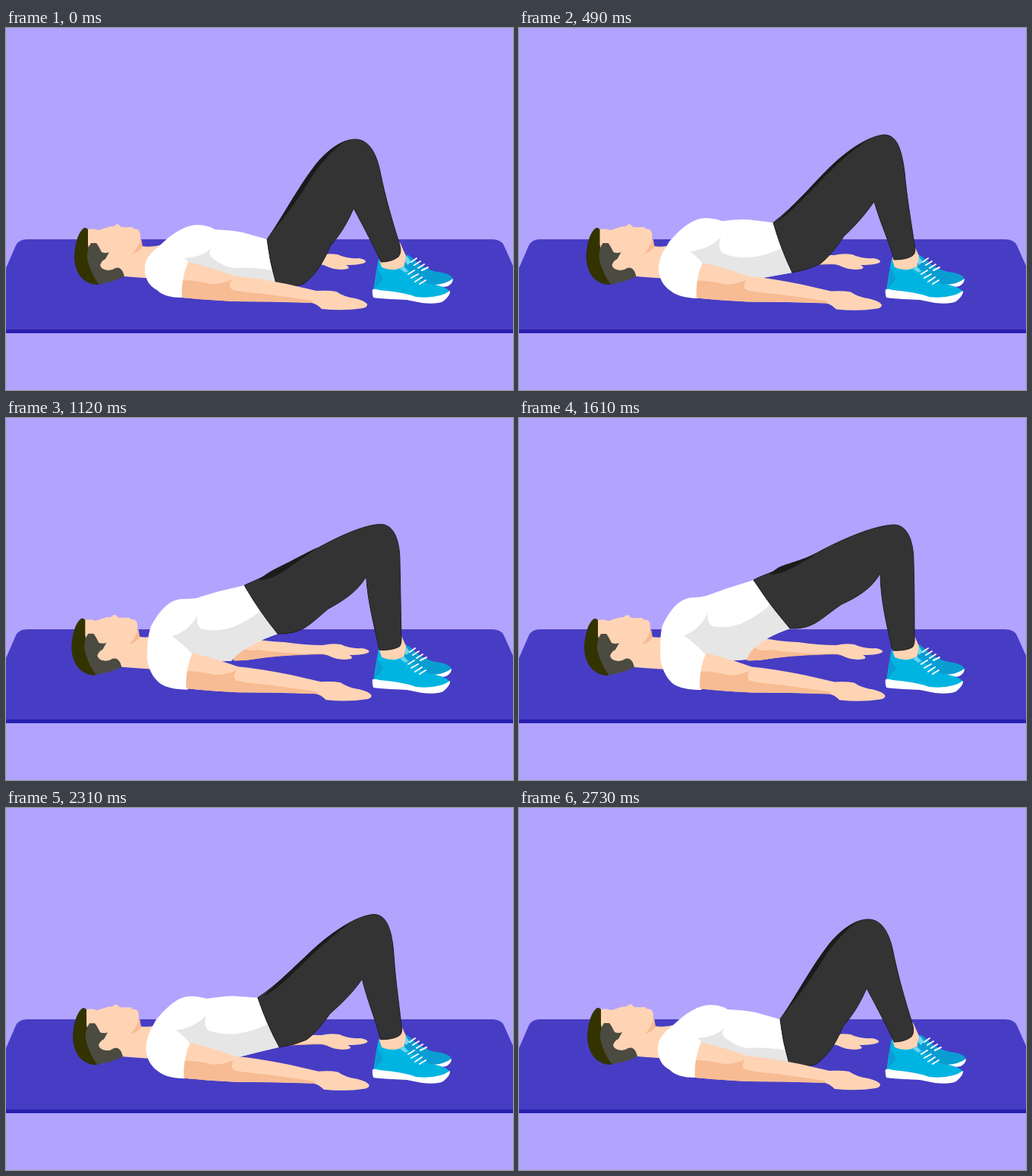
Write an HTML page that moves like this. It is 668x478 px and loops after 2.8 s.

```html
<!DOCTYPE html>
<html lang="en">
<head>
<meta charset="utf-8">
<title>Glute bridge</title>
<style>
  html, body { margin: 0; height: 100%; overflow: hidden; background: #b2a3ff; }
  svg { display: block; width: 100%; height: 100%; }
  .skin { fill: #ffd4b5; }
  .shade { fill: #f7bc93; }
  .blue { fill: #00b4e1; }
  .deep { fill: #0a9dd2; }
  .white { fill: #fff; }
  .lace { fill: none; stroke: #fff; stroke-width: 2; stroke-linecap: round; }
</style>
</head>
<body>
<svg viewBox="0 0 668 478">
  <path fill="#473dc4" d="M0 317L13 287Q17 279 28 279H640Q652 279 656 287L668 314V398H0Z"/>
  <path fill="#2a20b0" d="M0 398H668V403H0Z"/>

  <g id="farArm">
    <path class="skin" d="M300 320Q304 300 320 290Q340 295 368 296Q395 300 418 300Q430 297 442 299Q454 305 470 304Q480 306 479 309Q474 313 453 313Q459 316 455 318Q440 321 426 314Q420 311 400 312Q360 313 330 318Q312 321 300 320Z"/>
    <path class="shade" d="M300 320Q304 303 310 303Q322 309 331 306Q380 313 420 311L420 312Q365 313 330 318Q312 321 300 320Z"/>
  </g>

  <g id="farShoe">
    <path class="deep" d="M522 303Q527 297 532 301L545 312Q560 322 575 323Q588 326 589 332L580 340L560 340L526 320Z"/>
    <path class="white" d="M564 339Q580 338 589 331Q589 337 582 341Q574 343 564 341Z"/>
    <path fill="#6fd6f2" d="M523 304Q526 300 529 302L534 309L529 313Z"/>
    <path class="lace" d="M534 309L541 304M538 313L546 308M543 317L551 312M548 320L556 316"/>
  </g>

  <path class="skin" d="M492 303L519 283L527 301L524 318L508 322L492 318Z"/>

  <g id="head">
    <path class="skin" d="M108 266Q115 264 122 267Q130 264 138 262Q142 263 144 260L148 259L152 263L164 263Q167 262 168 265L174 266Q177 269 177 275Q176 281 179 288Q192 290 206 286L215 332Q180 330 156 328L124 332L106 300Z"/>
    <path class="shade" d="M178 277L180 289Q174 297 166 298Q174 290 178 277Z"/>
    <path fill="#333300" d="M103 264C95 269 90 287 90 304C91 323 101 338 120 339L127 337L113 310L108 286L108 266Q105 263 103 264Z"/>
    <path fill="#4b4b41" d="M112 284Q106 292 107 305Q112 325 122 338Q141 336 156 328L154 322Q150 315 144 317Q140 320 135 320Q125 319 124 313Q126 307 131 305L136 296Q131 298 126 296Q121 286 119 284Z"/>
  </g>

  <g id="body"></g>

  <g id="nearArm">
    <path class="skin" d="M240 309Q270 316 300 327Q330 330 370 338L409 347Q425 346 435 348Q445 355 460 357Q473 360 476 365Q476 369 470 370Q445 374 416 371Q409 364 403 363Q350 361 300 361Q262 359 232 356Q231 328 240 309Z"/>
    <path class="shade" d="M233 333Q231 345 232 356Q262 359 300 361Q370 361 404 363L403 360Q370 355 340 351Q305 348 297 345Q292 340 298 332Q285 338 270 338Q250 333 233 333Z"/>
  </g>

  <path class="blue" d="M491 304L495 316Q510 323 524 315Q528 317 531 320Q545 334 558 338Q577 340 584 347Q582 354 575 357L555 360L484 348Q487 325 491 304Z"/>
  <path class="deep" d="M489 317L497 331L486 344Z"/>
  <path fill="#6fd6f2" d="M519 318L524 315L530 321L526 323Z"/>
  <path class="white" d="M483 345Q487 344 492 346Q525 349 540 355Q570 358 585 347Q586 353 576 361Q568 365 548 363L528 359Q500 358 484 356Q482 350 483 345Z"/>
  <path class="lace" d="M530 325L538 320M534 330L543 325M539 335L548 329M545 338L553 333"/>
</svg>

<script>
const FRAME = 70, FRAMES = 40, MIRROR = 41;
const HELD = [6, 11, 18, 26, 36];
const $ = id => document.getElementById(id);

// [frame, pose] along the lift; the lowering mirrors it
const lift = [[0, 0], [2, 0], [7, 1], [8, 1.3], [12, 2], [18, 3], [20, 3.12]];

// Each part: fill, then one outline per pose from lying to raised
const parts = [
  ['#fff',
    'M183 318C183 300 198 292 206 284C220 271 236 260 252 260Q266 260 275 266Q300 267 312 270L344 279Q347 308 356 338Q348 339 340 340L290 332L232 356Q208 356 199 346Q183 338 183 318Z',
    'M184 318C185 300 192 293 198 282C212 266 228 251 246 251Q256 251 268 255Q290 252 303 253L335 257Q345 292 360 323Q337 327 310 332L290 328L235 357Q211 356 201 348Q185 338 184 318Z',
    'M185 318C187 300 188 292 195 277C208 258 222 243 238 243Q248 243 258 244Q280 239 292 237L324 235Q340 270 360 299Q327 310 290 324L270 323L237 358Q213 358 202 349Q187 338 185 318Z',
    'M186 314C187 300 185 288 189 274C199 252 213 237 230 237Q238 237 246 235Q260 230 274 225L309 214Q330 247 357 278Q306 296 300 319L272 321L240 359Q215 359 203 351Q188 338 186 314Z'],
  ['#e6e6e6',
    'M235 304Q262 302 271 289Q264 300 275 306Q288 316 302 317Q325 315 352 320L356 338Q348 339 340 340L290 332L240 309Q238 306 235 304Z',
    'M225 295Q252 292 266 276Q261 290 268 297Q280 303 300 303Q325 302 347 290L360 323Q337 327 310 332L290 328L242 311Q235 302 225 295Z',
    'M222 290Q250 284 260 265Q255 280 263 286Q290 292 310 287Q330 280 344 272L360 299Q327 310 290 324L270 323L245 312Q235 300 222 290Z',
    'M217 287Q240 279 249 256Q247 270 255 275Q280 279 300 268Q322 256 331 246L357 278Q306 296 300 319L272 321L247 314Q235 300 217 287Z'],
  ['#333',
    'M344 279C372 238 388 206 410 178C427 158 445 147 460 147C478 147 488 165 493 190C500 225 510 258 518 284Q522 296 517 302Q508 309 494 309C486 291 472 264 458 238C448 262 436 278 427 288C420 305 410 325 392 338Q376 344 356 338Q347 308 344 279Z',
    'M335 257C361 237 385 209 411 183C431 163 459 143 481 141C497 141 504 158 508 190C511 225 517 258 521 286Q524 297 518 301Q510 306 494 306C489 285 476 258 468 229C455 248 440 264 428 275C418 290 408 303 396 312Q378 320 360 323Q345 292 335 257Z',
    'M324 235C347 228 376 204 406 182C435 161 470 140 492 139C510 139 517 160 517 190C517 225 519 255 520 284Q522 297 518 300Q508 306 491 305C488 280 477 250 472 218C458 240 438 252 424 264C412 278 405 287 394 293Q380 299 360 299Q340 270 324 235Z',
    'M309 214C322 206 365 194 400 174C435 156 470 142 494 141C512 141 520 163 520 190C521 225 521 255 521 286Q522 300 518 303Q508 308 492 307C486 280 476 240 476 205C465 225 445 237 425 246C410 256 402 264 390 271Q376 279 357 278Q330 247 309 214Z'],
  ['#1b1b1b',
    'M344 281C370 238 387 207 409 179Q427 158 447 149Q425 165 405 193Q388 222 365 252Q352 267 344 281Z',
    'M339 257C362 235 385 208 410 183Q433 161 458 149Q430 168 406 193Q385 215 365 235Q352 248 339 257Z',
    'M338 230C352 217 379 203 404 183Q426 167 450 153Q430 170 404 189Q385 206 366 219Q352 228 338 230Z',
    'M330 207C342 194 352 194 368 188Q380 184 392 179Q380 187 374 190Q364 196 356 200Q345 206 330 207Z']
];

// Groups that only slide: [x, y] per pose
const slides = {
  head: [[0, 0], [-1.5, 0], [-3, .5], [-4, 1]],
  farArm: [[-5, 0], [-3, 0], [-2, 0], [0, 0]],
  nearArm: [[0, 0], [2, .5], [4, 1], [6.5, 1.5]],
  farShoe: [[0, 0], [-2, 0], [-2, 0], [-2, 0]]
};

const mix = (a, b, u) => a + (b - a) * u;

const paths = parts.map(([fill]) => {
  const path = document.createElementNS('http://www.w3.org/2000/svg', 'path');
  path.setAttribute('fill', fill);
  if (fill === '#333') path.setAttribute('stroke', '#1f1f1f');
  return $('body').appendChild(path);
});

function morph(a, b, u) {
  const end = b.match(/\d+/g);
  let i = 0;
  return a.replace(/\d+/g, n => mix(+n, +end[i++], u).toFixed(2));
}

function poseAt(ms) {
  let k = Math.floor(ms / FRAME) % FRAMES;
  if (HELD.includes(k)) k--;
  const d = Math.min(k, MIRROR - k);
  const i = Math.max(1, lift.findIndex(([f]) => f >= d));
  const [f0, p0] = lift[i - 1], [f1, p1] = lift[i];
  return mix(p0, p1, (d - f0) / (f1 - f0));
}

function draw(pose) {
  const i = Math.min(2, Math.floor(pose)), u = pose - i;
  parts.forEach(([, ...shapes], n) =>
    paths[n].setAttribute('d', morph(shapes[i], shapes[i + 1], u)));
  for (const id in slides) {
    const [a, b] = slides[id].slice(i, i + 2);
    $(id).setAttribute('transform', `translate(${mix(a[0], b[0], u)} ${mix(a[1], b[1], u)})`);
  }
}

function tick() {
  draw(poseAt(performance.now()));
  requestAnimationFrame(tick);
}
tick();
</script>
</body>
</html>
```
